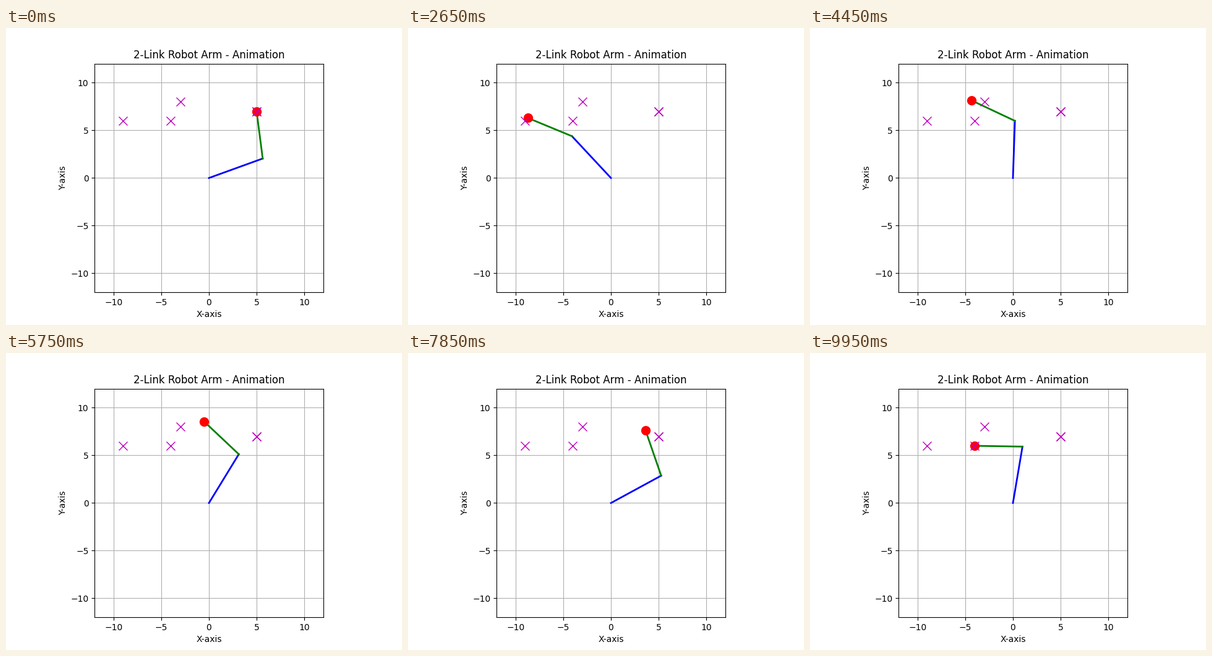
Animation, 640 px wide and 480 px high, one loop 10000 ms. Source, as a matplotlib script:

```python
import numpy as np
import matplotlib.pyplot as plt
from matplotlib.animation import FuncAnimation

L1, L2 = 6, 5
TARGETS = [(5, 7), (-9, 6), (-3, 8), (5, 7), (-4, 6)]
STEPS = 50  # frames per move, both end poses included


def solve_angles(x, y):
    """Inverse kinematics: shoulder and elbow angles that reach (x, y)."""
    elbow = np.arccos((x**2 + y**2 - L1**2 - L2**2) / (2 * L1 * L2))
    shoulder = np.arctan2(y, x) - np.arctan2(L2 * np.sin(elbow),
                                             L1 + L2 * np.cos(elbow))
    return np.array([shoulder, elbow])


def joint_positions(shoulder, elbow):
    x1, y1 = L1 * np.cos(shoulder), L1 * np.sin(shoulder)
    x2 = x1 + L2 * np.cos(shoulder + elbow)
    y2 = y1 + L2 * np.sin(shoulder + elbow)
    return x1, y1, x2, y2


poses = [solve_angles(*p) for p in TARGETS]

fig, ax = plt.subplots(figsize=(6.4, 4.8), dpi=100)
ax.set_xlim(-12, 12)
ax.set_ylim(-12, 12)
ax.set_aspect("equal")
ax.grid(True)
ax.set_title("2-Link Robot Arm - Animation")
ax.set_xlabel("X-axis")
ax.set_ylabel("Y-axis")

upper, = ax.plot([], [], "b-", lw=2)
lower, = ax.plot([], [], "g-", lw=2)
tip, = ax.plot([], [], "ro", markersize=10)
for tx, ty in TARGETS:
    ax.plot(tx, ty, "mx", markersize=10)


def update(frame):
    move, step = divmod(frame, STEPS)
    t = step / (STEPS - 1)
    x1, y1, x2, y2 = joint_positions(*((1 - t) * poses[move] + t * poses[move + 1]))
    upper.set_data([0, x1], [0, y1])
    lower.set_data([x1, x2], [y1, y2])
    tip.set_data([x2], [y2])
    return upper, lower, tip


anim = FuncAnimation(fig, update, frames=STEPS * (len(TARGETS) - 1),
                     init_func=lambda: update(0), interval=50, repeat=True)
plt.show()
```
